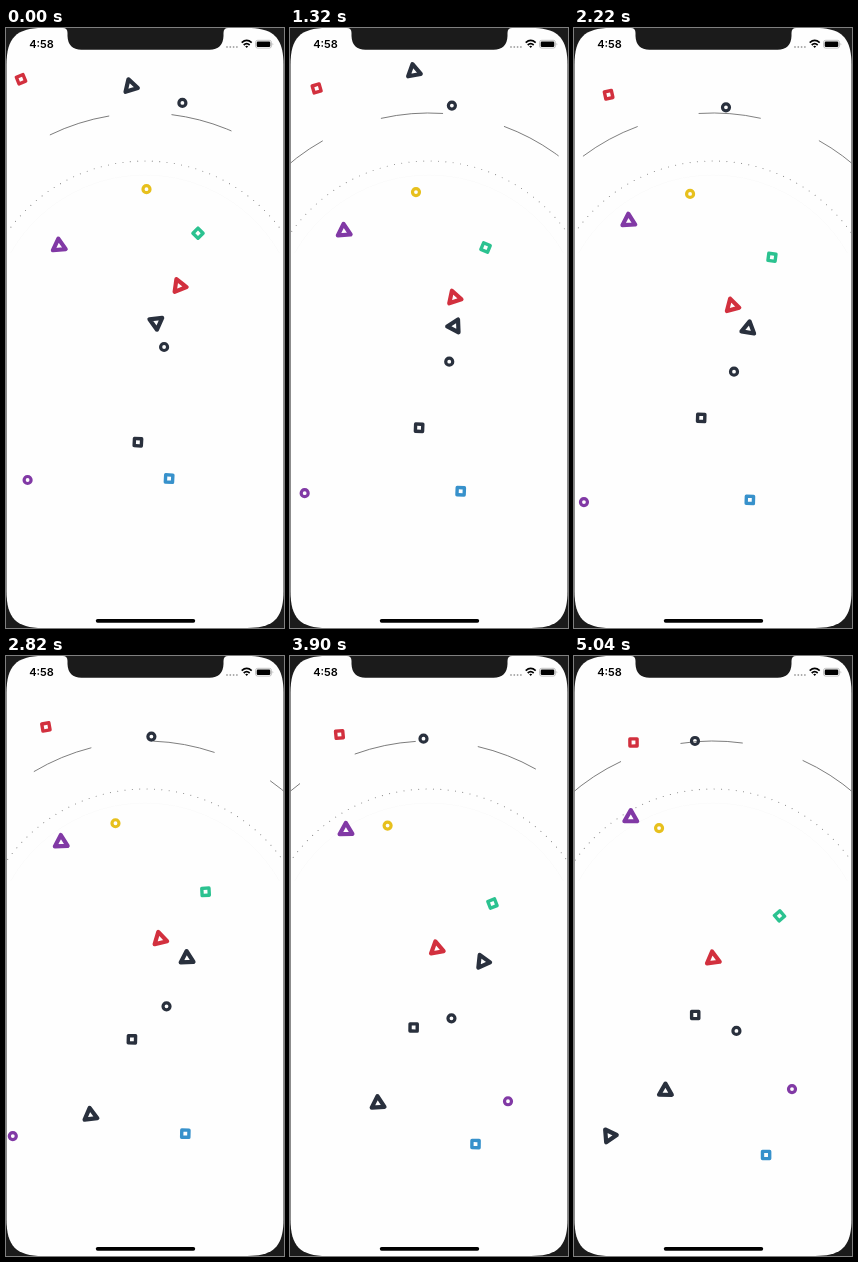
Recreate the animation shown at these times as an HTML page. Size 278 by 600 pixels, loop 5.1 s.

```html
<!DOCTYPE html>
<html lang="en">
<head>
<meta charset="utf-8">
<title>Floating shapes</title>
<style>
  html, body { margin: 0; width: 100%; height: 100%; overflow: hidden; background: #1b1b1b; }
  svg { display: block; width: 278px; height: 600px; }
  .clock { font: 600 11px Inter, "Liberation Sans", sans-serif; }
  #shapes * { fill: none; stroke-linejoin: round; }
</style>
</head>
<body>
<svg viewBox="0 0 278 600">
  <defs>
    <clipPath id="upper"><rect x="0.5" width="277" height="225"/></clipPath>
  </defs>
  <path fill="#fefefe" d="M0.5 37C0.5 10 10 0 37 0H241C268 0 277.500 10 277.500 37V563
    C277.500 590 268 600 241 600H37C10 600 0.500 590 0.500 563Z"/>

  <g clip-path="url(#upper)" fill="none">
    <circle cx="139" cy="302" r="155" stroke="#fbfbfb"/>
    <circle id="dots" cx="139" cy="302" r="169" stroke="#8a8a8a" stroke-width="1.1"
      stroke-linecap="round" pathLength="360" stroke-dasharray="0 2.5"/>
    <circle id="dashes" cx="139" cy="302" r="217" stroke="#6c6c6c" stroke-width="0.8"
      pathLength="360" stroke-dasharray="16.5 16.5"/>
  </g>

  <g id="shapes"></g>

  <path d="M57 0Q61.500 0 61.500 5V8Q62 21.700 75.500 21.700H203.500Q217 21.700 217.500 8V5Q217.500 0 222 0Z" fill="#1b1b1b"/>
  <text class="clock" x="23.200" y="20">4:58</text>
  <g fill="#a5a5a5">
    <circle cx="221" cy="19" r="0.9"/><circle cx="224.300" cy="19" r="0.9"/>
    <circle cx="227.600" cy="19" r="0.9"/><circle cx="230.900" cy="19" r="0.9"/>
  </g>
  <g fill="none" stroke="#000" stroke-width="1.7">
    <path d="M235.700 14.600Q240.700 10.200 245.700 14.600M237.700 17Q240.700 14.400 243.700 17"/>
    <path d="M239.200 18.300L240.700 20L242.200 18.300Q240.700 17.200 239.200 18.300Z" fill="#000" stroke="none"/>
  </g>
  <rect x="249.500" y="12.300" width="16" height="7.800" rx="2.200" fill="none" stroke="#b4b4b4" stroke-width="0.8"/>
  <rect x="250.700" y="13.500" width="13.600" height="5.400" rx="1.200"/>
  <path d="M266.600 14.800Q268.200 16.200 266.600 17.600Z" fill="#aaa"/>
  <rect x="89.800" y="591" width="99.400" height="3.700" rx="1.850"/>
</svg>
<script>
  const LOOP = 5100, STEP = 60;
  const DARK = '#29303d', RED = '#d2303e', YELLOW = '#e7c01d',
        GREEN = '#2bc290', PURPLE = '#8139a5', BLUE = '#3791cb';

  // path and line width of each kind, centred on the origin
  const KINDS = {
    ring: ['M-3.5 0a3.5 3.5 0 1 0 7 0a3.5 3.5 0 1 0 -7 0Z', 3.2],
    box: ['M-3.6 -3.6H3.6V3.6H-3.6Z', 3.4],
    tri: ['M0 -7.4L6.4 3.7H-6.4Z', 4.2]
  };

  // kind, colour, x, y, speed x, speed y, angle, spin, appears, leaves (seconds)
  const SHAPES = [
    ['box', RED, 15, 51.2, 8.83, 7, -22, 4.3],
    ['tri', DARK, 124.6, 58.4, -0.6, -11.3, -17, 5, 0, 1.68],
    ['ring', DARK, 176.4, 74.9, -11, 2],
    ['ring', YELLOW, 140.5, 161.2, -11, 2.15],
    ['box', GREEN, 192, 205.2, 2.68, 10.85, 45, -17],
    ['tri', PURPLE, 53, 218, 0.75, -11.2, -5, 1],
    ['tri', RED, 173.2, 258, -6.8, 8.9, -22, 3],
    ['tri', DARK, 150.2, 294.3, 10.9, 2.9, 54, -20, 0, 4.08],
    ['ring', DARK, 158.1, 319, 0.86, 11.1],
    ['box', DARK, 131.9, 414.2, -2.12, -10.95, 3, -0.6],
    ['ring', PURPLE, 21.6, 452, -5.25, 9.95, 0, 0, 0, 2.88],
    ['box', BLUE, 163.1, 450.6, 5.75, 9.6, 3, -0.6],
    ['tri', DARK, 75.8, 490, 3.1, -10.9, -15.5, 3.1, 2.58],
    ['ring', PURPLE, 218, 487, 0, -10.7, 0, 0, 3.78],
    ['tri', DARK, 15.2, 530, 4, -10, -85, 10, 4.86]
  ];

  const byId = id => document.getElementById(id);
  const nodes = SHAPES.map(([kind, color]) => {
    const node = document.createElementNS('http://www.w3.org/2000/svg', 'path');
    const [d, width] = KINDS[kind];
    node.setAttribute('d', d);
    node.setAttribute('stroke', color);
    node.setAttribute('stroke-width', width);
    return byId('shapes').appendChild(node);
  });

  const turn = (id, angle) =>
    byId(id).setAttribute('transform', `rotate(${angle} 139 302)`);

  function draw(s) {
    turn('dashes', 10 * s - 248);
    turn('dots', 10 * s);
    SHAPES.forEach(([, , x, y, vx, vy, angle = 0, spin = 0, from = 0, to = 9], i) => {
      nodes[i].setAttribute('visibility', s >= from && s < to ? 'visible' : 'hidden');
      nodes[i].setAttribute('transform',
        `translate(${x + vx * s} ${y + vy * s}) rotate(${angle + spin * s})`);
    });
  }

  const start = performance.now();
  function tick() {
    const ms = (performance.now() - start) % LOOP;
    draw(Math.floor(ms / STEP) * STEP / 1000);
    requestAnimationFrame(tick);
  }
  tick();
</script>
</body>
</html>
```
